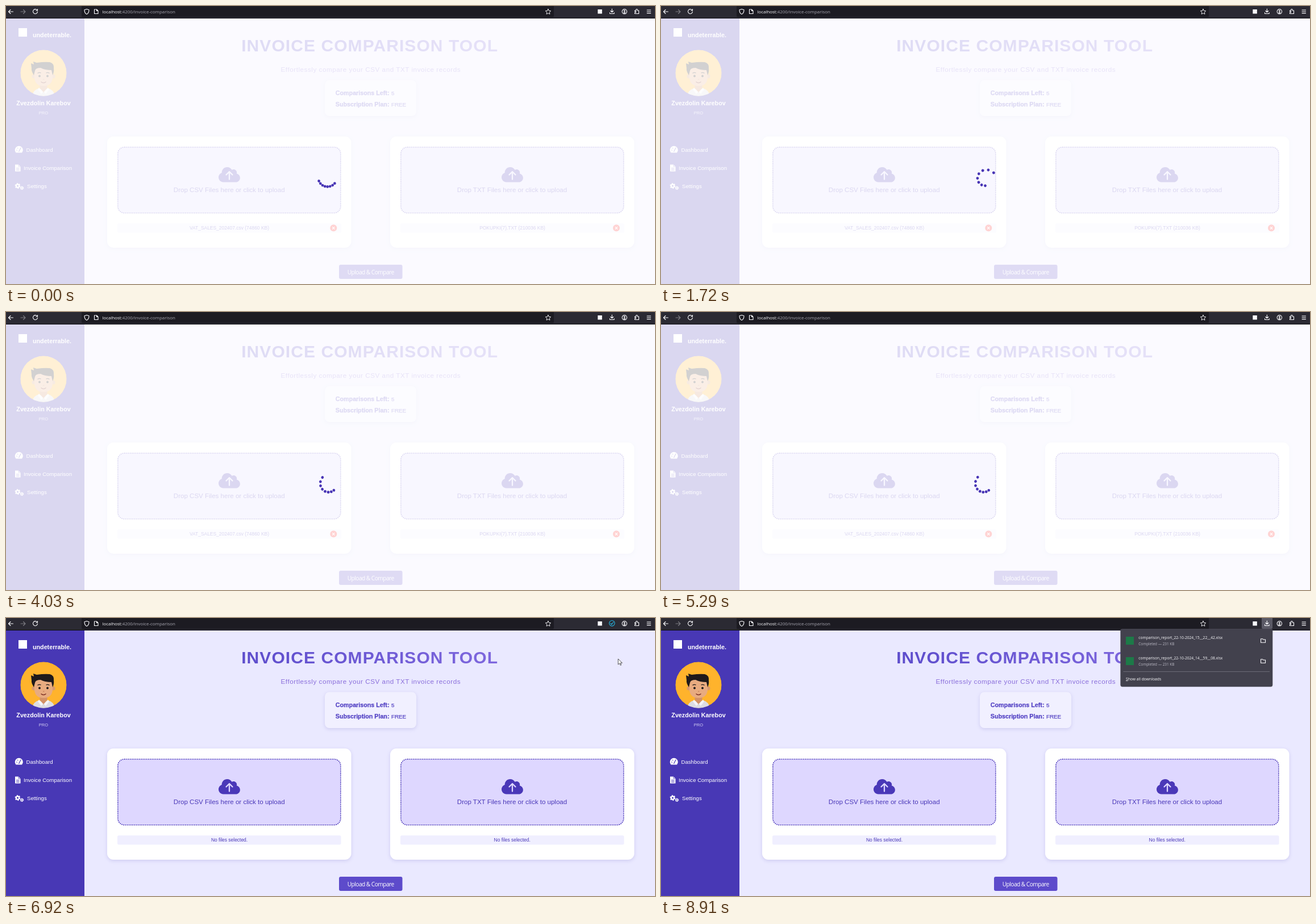
Animation, 1142 px wide and 490 px high, one loop 9.37 s. Source, as an HTML page:

```html
<!DOCTYPE html>
<html lang="en">
<head>
<meta charset="utf-8">
<title>Invoice comparison</title>
<style>
  html, body { margin: 0; width: 100%; height: 100%; overflow: hidden; background: #eae9ff; }
  svg { display: block; width: 1142px; height: 490px; font-family: "Liberation Sans", Arial, sans-serif; }
  .ui { font-family: "Open Sans", "Noto Sans", sans-serif; }
  .line { fill: none; stroke: #fbfbfe; stroke-width: 1.1; stroke-linecap: round; stroke-linejoin: round; }
  .mid { text-anchor: middle; }
  .bold { font-weight: 700; }
  .nav { font-size: 9.65px; fill: #fff; }
  .card { fill: #fff; filter: drop-shadow(0 2px 3px rgba(70, 55, 170, .16)); }
  .drop { fill: #ded7ff; stroke: #4a38b8; stroke-width: 1.6; stroke-dasharray: 1.8 1.4; }
  .hint { font-size: 11.55px; fill: #4a38b8; }
  .small { font-size: 8.45px; fill: #4a38b8; }
  .plan { fill: #5443c4; font-size: 9.75px; stroke: #5443c4; stroke-width: .25; }
  .plan .bold { font-size: 10.72px; }
  .file { font-size: 6.65px; fill: #fbfbfe; }
  .size { font-size: 6.4px; fill: #bcbbc6; }
</style>
</head>
<body>
<svg viewBox="0 0 1142 490">
  <defs>
    <linearGradient id="ink" gradientUnits="userSpaceOnUse" x1="414" x2="868" y1="0" y2="0">
      <stop offset="0" stop-color="#5d4dcc"/><stop offset="1" stop-color="#7f68de"/>
    </linearGradient>
    <clipPath id="round"><circle cx="66" cy="118" r="40.7"/></clipPath>
    <g id="zone">
      <rect class="card" x="178" y="230" width="429.5" height="196" rx="11"/>
      <rect class="drop" x="196.8" y="248.8" width="392" height="116" rx="11.5"/>
      <path fill="#4a38b8" transform="translate(374 282.2) scale(.0592)" d="M537.6 226.6c4.1-10.7 6.4-22.4 6.4-34.6 0-53-43-96-96-96-19.7 0-38.1 6-53.3 16.2C367 64.2 315.3 32 256 32c-88.4 0-160 71.6-160 160v8C40 220 0 273 0 336c0 79.5 64.5 144 144 144h368c70.7 0 128-57.3 128-128 0-62-44-113.600-102.400-125.400z"/>
      <path d="M393 305.500V292.500M387.500 297.500 393 292l5.500 5.500" fill="none" stroke="#ded7ff" stroke-width="2.300" stroke-linecap="round" stroke-linejoin="round"/>
      <rect x="196" y="383.300" width="393.500" height="16.200" rx="2.500" fill="#f0efff"/>
    </g>
    <g id="remove">
      <circle r="6" fill="#f22"/>
      <path d="M-2.200-2.200 2.200 2.200M2.200-2.200-2.200 2.200" stroke="#fff" stroke-width="1.100"/>
    </g>
    <path id="folder" class="line" stroke-width=".9" d="M-4-3.300h3l1.200 1.300h3.800v5.300h-8z"/>
    <g id="gear">
      <circle r="2.700" fill="none" stroke="#fff" stroke-width="2.200"/>
      <circle r="4.200" fill="none" stroke="#fff" stroke-width="1.500" stroke-dasharray="2.200"/>
    </g>
  </defs>

  <!-- page -->
  <rect width="1142" height="490" fill="#eae9ff"/>
  <rect width="138" height="490" fill="#4838b5"/>
  <rect x="22" y="39" width="15" height="15" fill="#fff"/>
  <text class="bold" x="47" y="55" font-size="10.72" fill="#fff">undeterrable.</text>

  <g clip-path="url(#round)">
    <circle cx="66" cy="118" r="40.700" fill="#ffb32c"/>
    <path d="M46 160q1-12 12-15l8 4 8-4q11 3 12 15z" fill="#dcdce3"/>
    <path d="M59.500 134h13v10l-6.500 9-6.500-9z" fill="#d29167"/>
    <path d="M58 144l8 8 8-8 2 3-6 8-4-4-4 4-6-8z" fill="#f4f4f8"/>
    <circle cx="49" cy="124" r="3.600" fill="#d99a6e"/>
    <circle cx="83" cy="124" r="3.600" fill="#d99a6e"/>
    <path d="M50 106h32v20q-1 15-16 15t-16-15z" fill="#e8ab80"/>
    <path d="M49 122q-5-8-4-12l-1-9 5 2-1-5 6 2q14-2 23-1 8 2 7 11 1 6-2 12l-2-9q-12 0-19-4-9 0-10 5z" fill="#1f1a1b"/>
    <path d="M55.500 118.500q3-2 6-.500M70.500 118q3-1.500 6 .500" fill="none" stroke="#1f1a1b" stroke-width="1.300"/>
    <circle cx="59" cy="123.500" r="1.900" fill="#1f1a1b"/>
    <circle cx="73" cy="123.500" r="1.900" fill="#1f1a1b"/>
    <path d="M65 129q1 1 2.500 0" fill="none" stroke="#b9774f"/>
    <path d="M61.500 133.500q4.500 4 9 0" fill="none" stroke="#7c2f22" stroke-width="1.200"/>
  </g>
  <text class="bold mid" x="66" y="175" font-size="10.72" fill="#fff">Zvezdolin Karebov</text>
  <text class="mid" x="66" y="190.500" font-size="7.5" fill="#d3cdf2">PRO</text>

  <path d="M17.500 258.500a7 7 0 1 1 10.500 0z" fill="#fff"/>
  <path d="M22.700 256.500 26 250M18.500 254h1M20 250.500h1" stroke="#4838b5" stroke-width="1.200" stroke-linecap="round"/>
  <text class="nav" x="35.500" y="256.500">Dashboard</text>
  <path d="M16 279.500h6l3.500 3.500v8.500H16z" fill="#fff"/>
  <path d="M22 279.500v3.500h3.500M18 285.500h5.500M18 287.500h5.500M18 289.500h5.500" fill="none" stroke="#4838b5" stroke-width=".8"/>
  <text class="nav" x="31" y="289">Invoice Comparison</text>
  <use href="#gear" x="20.500" y="317"/>
  <use href="#gear" transform="translate(28 320.800) scale(.66)"/>
  <text class="nav" x="37" y="321">Settings</text>

  <text class="bold" x="414.2" y="80" font-size="30" letter-spacing="1.07" fill="url(#ink)">INVOICE COMPARISON TOOL</text>
  <text class="mid" x="641.8" y="116.300" font-size="11.7" letter-spacing=".53" fill="#8a6edb">Effortlessly compare your CSV and TXT invoice records</text>

  <rect class="card" x="561" y="130.500" width="161" height="63.500" rx="8" style="fill:#f1f0ff"/>
  <g class="plan">
    <text class="bold" x="579.800" y="156.700">Comparisons Left:</text><text x="678" y="156.700">5</text>
    <text class="bold" x="579.800" y="176.500">Subscription Plan:</text><text x="678" y="176.500">FREE</text>
  </g>

  <use href="#zone"/>
  <use href="#zone" x="498"/>
  <text class="hint mid" x="392.700" y="328.200">Drop CSV Files here or click to upload</text>
  <text class="hint mid" x="890.500" y="328.200">Drop TXT Files here or click to upload</text>
  <g id="empty">
    <text class="small mid" x="393" y="394.300">No files selected.</text>
    <text class="small mid" x="890.700" y="394.300">No files selected.</text>
  </g>
  <g id="chosen">
    <text class="small mid" x="393" y="394.300">VAT_SALES_202407.csv (74860 KB)</text>
    <text class="small mid" x="891" y="394.300">POKUPKI(7).TXT (210036 KB)</text>
    <use href="#remove" x="576.300" y="391.300"/>
    <use href="#remove" x="1074" y="391.300"/>
  </g>
  <rect x="586" y="456" width="111.500" height="25" rx="3" fill="#5d4bcb"/>
  <text class="ui mid" x="641.700" y="472.500" font-size="10.2" letter-spacing="-.55" fill="#fff">Upload &amp; Compare</text>

  <g id="loading">
    <rect y="22" width="1142" height="468" fill="#fff" opacity=".8"/>
    <g id="dots" transform="translate(570 306)" fill="#4835b5"></g>
  </g>

  <!-- browser bar -->
  <rect width="1142" height="22" fill="#2b2a33"/>
  <rect y="21" width="1142" height="1" fill="#0e0e12"/>
  <rect x="133" y="-3" width="831" height="22.500" rx="2" fill="#1c1b22"/>
  <rect id="hover" x="1057" y="-2" width="19" height="21" rx="2" fill="#5b5a66"/>
  <g class="line">
    <path d="M12.500 10H4.500M8 6.500 4.500 10 8 13.500"/>
    <path d="M26 10h8M30.500 6.500 34 10l-3.500 3.500" opacity=".4"/>
    <path d="M54.500 7a4 4 0 1 0 1 3M55.500 5.500v2.500H53"/>
    <path d="M142 5.500l4 1.300q0 6-4 7.700-4-1.700-4-7.700z"/>
    <path d="M155.500 6h4l2.500 2.500v5h-6.500zM159.500 6v2.500H162"/>
    <path d="M954 5.300l1.400 3 3.300.400-2.400 2.300.600 3.300-2.900-1.600-2.900 1.600.600-3.300-2.400-2.300 3.300-.400z" stroke-width=".9"/>
    <circle cx="1088.300" cy="9.800" r="4.200"/>
    <path d="M1106.500 8h2.200q-.700-2.500 1.200-2.500t1.200 2.500h2.400v5.500h-7v-2q2 .200 2-.900t-2-.900z"/>
    <path d="M1128 7h6.500M1128 9.800h6.500M1128 12.600h6.500"/>
  </g>
  <circle cx="1088.300" cy="8.700" r="1.500" fill="#fbfbfe"/>
  <path d="M1085.800 12q2.500-2 5 0l-2.500 1.500z" fill="#fbfbfe"/>
  <rect x="1041.300" y="6" width="7.500" height="7.500" fill="#fbfbfe"/>
  <text class="ui" x="169.500" y="13" font-size="7.92" fill="#fbfbfe">localhost:<tspan fill="#a9a8b2">4200/invoice-comparison</tspan></text>
  <g id="save" class="line">
    <path id="arrow" d="M1066.300 5v5.800M1063.800 8.500l2.500 2.500 2.500-2.500"/>
    <path d="M1062.500 11.500v2h7.600v-2"/>
  </g>
  <g id="done" class="line" style="stroke:#25b9e6">
    <circle id="ring" cx="1066.300" cy="9.300" r="4.800" pathLength="1" stroke-dasharray="1 1" transform="rotate(-90 1066.300 9.300)"/>
    <path id="tick" d="M1064 9.500l1.700 1.800 3-3.800" pathLength="1" stroke-dasharray="1 1"/>
  </g>

  <g id="panel" class="ui">
    <rect x="808.700" y="19.500" width="267.300" height="101.500" rx="3" fill="#42414d" stroke="#52515e" stroke-width=".6"/>
    <rect x="818" y="33" width="14" height="14" fill="#1d7a48"/>
    <text class="file" x="840.300" y="36.500">comparison_report_22-10-2024_15__22__42.xlsx</text>
    <text class="size" x="840.300" y="47.800">Completed — 231 KB</text>
    <use href="#folder" x="1059.500" y="40"/>
    <rect x="818" y="69" width="14" height="14" fill="#1d7a48"/>
    <text class="file" x="840.300" y="73">comparison_report_22-10-2024_14__59__08.xlsx</text>
    <text class="size" x="840.300" y="84.300">Completed — 231 KB</text>
    <use href="#folder" x="1059.500" y="76"/>
    <path d="M813.500 94.500H1071" stroke="#777681" stroke-width=".8"/>
    <text class="file" x="818" y="109.500" style="font-size:6.75px"><tspan text-decoration="underline">S</tspan>how all downloads</text>
  </g>
  <path id="cursor" d="M0 0V10L2.400 7.800 4 11.300 5.500 10.700 4 7.200H7.200Z" fill="#fff" stroke="#111" stroke-width=".7"/>
</svg>
<script>
const LOOP = 9370, READY = 5370, SPIN = 1255;
const $ = id => document.getElementById(id);
const show = (id, on) => { $(id).style.display = on ? "" : "none"; };
const clamp = v => Math.min(1, Math.max(0, v));
const span = (t, from, to) => clamp((t - from) / (to - from));

// Cursor stops: time, x, y
const PATH = [
  [6510, 1101, 349], [6720, 1092, 190], [6950, 1075, 55], [7150, 1068, 17],
  [7260, 1067, 12], [7640, 1067, 12], [7850, 1100, 70], [8060, 1128, 190],
  [8270, 1133, 338], [8550, 1130, 420], [8910, 1113, 490]
];

// Eight dots on an arc whose centre lies off the turning point
const dots = Array.from({ length: 8 }, (_, i) => {
  const a = (45 + 15 * i) * Math.PI / 180;
  const dot = document.createElementNS("http://www.w3.org/2000/svg", "circle");
  dot.setAttribute("cx", -4.4 + 17 * Math.cos(a));
  dot.setAttribute("cy", -4.5 + 17 * Math.sin(a));
  dot.setAttribute("r", 2.4);
  $("dots").append(dot);
  return dot;
});

// cubic-bezier(.5, 0, .5, 1)
function ease(x) {
  let lo = 0, hi = 1;
  for (let i = 0; i < 20; i++) {
    const s = (lo + hi) / 2;
    if (1.5 * s * (1 - s) + s ** 3 < x) lo = s; else hi = s;
  }
  return lo * lo * (3 - 2 * lo);
}

function spin(t) {
  const tick = Math.max(0, Math.floor((t - 40) / 70) * 70 + 40);
  dots.forEach((dot, i) => {
    const turn = (tick + 36 * i) / SPIN - 0.108;
    const part = turn - Math.floor(turn);
    dot.setAttribute("transform", `rotate(${360 * ease(part)})`);
  });
}

function moveCursor(t) {
  const i = PATH.findIndex((p, n) => n && t >= PATH[n - 1][0] && t < p[0]);
  show("cursor", i > 0);
  if (i < 1) return;
  const [t0, x0, y0] = PATH[i - 1], [t1, x1, y1] = PATH[i];
  const k = (t - t0) / (t1 - t0);
  $("cursor").setAttribute("transform", `translate(${x0 + (x1 - x0) * k} ${y0 + (y1 - y0) * k})`);
}

function render(t) {
  const busy = t < READY;
  show("loading", busy);
  show("chosen", busy);
  show("empty", !busy);
  if (busy) spin(t);

  const checked = t >= 5600 && t < 7600;
  show("save", !checked);
  show("done", checked);
  const drop = t < 5600 ? 2 * span(t, READY, 5600) : 0;
  $("arrow").setAttribute("transform", `translate(0 ${drop})`);
  $("ring").style.strokeDashoffset = 1 - span(t, 5560, 5780);
  $("tick").style.strokeDashoffset = 1 - span(t, 5700, 5900);
  show("tick", t > 5700);

  show("hover", t >= 7150);
  show("panel", t >= 7400);
  $("panel").style.opacity = span(t, 7370, 7555);
  moveCursor(t);
}

const start = performance.now();
function frame() {
  render((performance.now() - start) % LOOP);
  requestAnimationFrame(frame);
}
frame();
</script>
</body>
</html>
```
